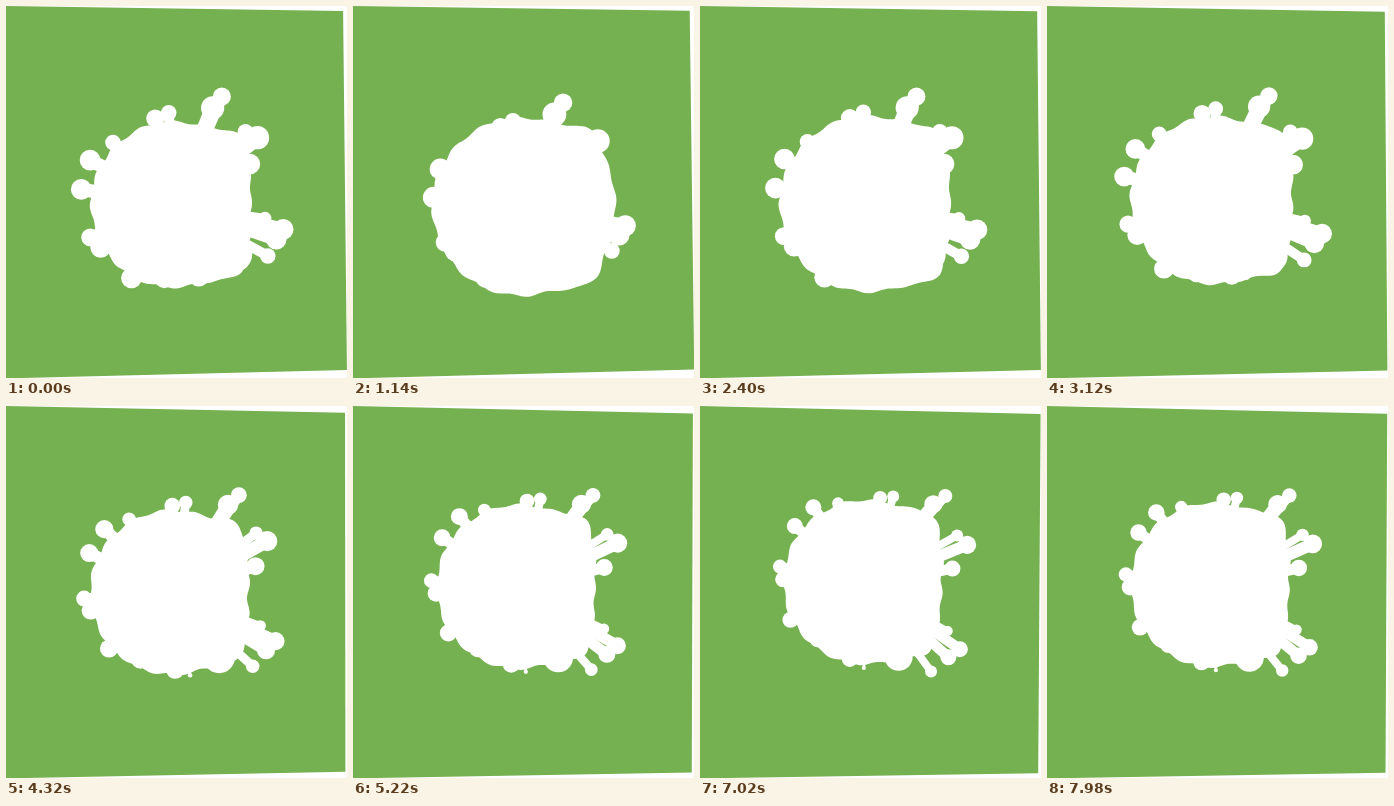
Animation, 341 px wide and 372 px high, one loop 8000 ms. Source, as an HTML page with a canvas:

```html
<!DOCTYPE html>
<html lang="en">
<head>
<meta charset="utf-8">
<title>Turning silhouette</title>
<style>
html, body { margin: 0; width: 100%; height: 100%; overflow: hidden; background: #fff; }
canvas { display: block; width: 341px; height: 372px; }
</style>
</head>
<body>
<canvas id="stage" width="341" height="372"></canvas>
<script>
const LOOP = 8000, STEP = 60, DEG = Math.PI / 180;
const GREEN = '#75b150', WHITE = '#fff';
const ctx = document.getElementById('stage').getContext('2d');

// Lobes around the body: angle in degrees at full turn, distance, radius.
const lobes = [
  [-49, 118, 7], [-51, 104, 9], [-29, 102, 6], [-22, 107, 9], [-11, 86, 8],
  [30, 92, 5], [35, 112, 8], [42, 108, 8], [54, 107, 6], [67, 78, 14],
  [93, 83, 2], [104, 76, 8], [133, 74, 8], [156, 85, 8], [184, 85, 8],
  [192, 90, 7], [219, 94, 8], [235, 95, 8], [250, 87, 6], [278, 88, 7], [286, 92, 6]
];

const bell = (x, mid, width) => Math.exp(-(((x - mid) / width) ** 2));
const cosDeg = a => Math.cos(a * DEG);
const polar = (c, a, r) => [c.x + r * cosDeg(a), c.y + r * Math.sin(a * DEG)];

// The turn rocks slowly between about 0 and 1.
const turnAt = t => 0.46 - 0.54 * Math.cos(Math.PI * (t - 1150) / 5650);

function fill(points, color) {
  ctx.beginPath();
  points.forEach(p => ctx.lineTo(...p));
  ctx.closePath();
  ctx.fillStyle = color;
  ctx.fill();
}

function drawSheet(turn) {
  fill([
    [0, 0],
    [337 + 3.6 * turn, 5 + 3 * turn],
    [341 - 2.8 * turn, 363.8 + 3.4 * turn],
    [0, 372.4]
  ], GREEN);
}

// A rounded body whose right side stays flat, with two corners, as the rest turns.
function drawBody(c, t, turn, bulge) {
  const size = 82 + 9 * bell(t, 1700, 1100);
  const points = [];
  for (let a = -180; a < 180; a += 1.5) {
    const own = a - 30 * (turn - 1);
    const r = size
      + 12 * bell(Math.abs(a), 47, 14)
      - 6 * bell(a, 0, 18)
      + 11 * bulge * bell(a, 0, 35)
      + 4 * turn * cosDeg(own - 230)
      + 1.3 * Math.sin(16 * own * DEG);
    points.push(polar(c, a, r));
  }
  fill(points, WHITE);
}

function drawLobe(c, [angle, distance, radius], turn, bulge) {
  const a = angle + (turn - 1) * (27 + 10 * cosDeg(angle - 150));
  const tip = polar(c, a, distance - 6 * bulge);
  const size = radius * (1 + 0.3 * (1 - turn));
  ctx.beginPath();
  ctx.moveTo(...polar(c, a, 60));
  ctx.lineTo(...tip);
  ctx.lineWidth = size * 1.3;
  ctx.strokeStyle = WHITE;
  ctx.stroke();
  ctx.beginPath();
  ctx.arc(...tip, size, 0, 2 * Math.PI);
  ctx.fillStyle = WHITE;
  ctx.fill();
}

function draw(now) {
  const t = Math.floor((now % LOOP) / STEP) * STEP;
  const turn = turnAt(t);
  const bulge = bell(t, 1140, 500);
  const center = { x: 168, y: 199 - 20 * turn };

  ctx.fillStyle = WHITE;
  ctx.fillRect(0, 0, 341, 372);
  drawSheet(turn);
  drawBody(center, t, turn, bulge);
  lobes.forEach(lobe => drawLobe(center, lobe, turn, bulge));
}

let origin;
function tick(now) {
  origin ??= now;
  draw(Math.max(0, now - origin));
  requestAnimationFrame(tick);
}
draw(0);
requestAnimationFrame(tick);
</script>
</body>
</html>
```
